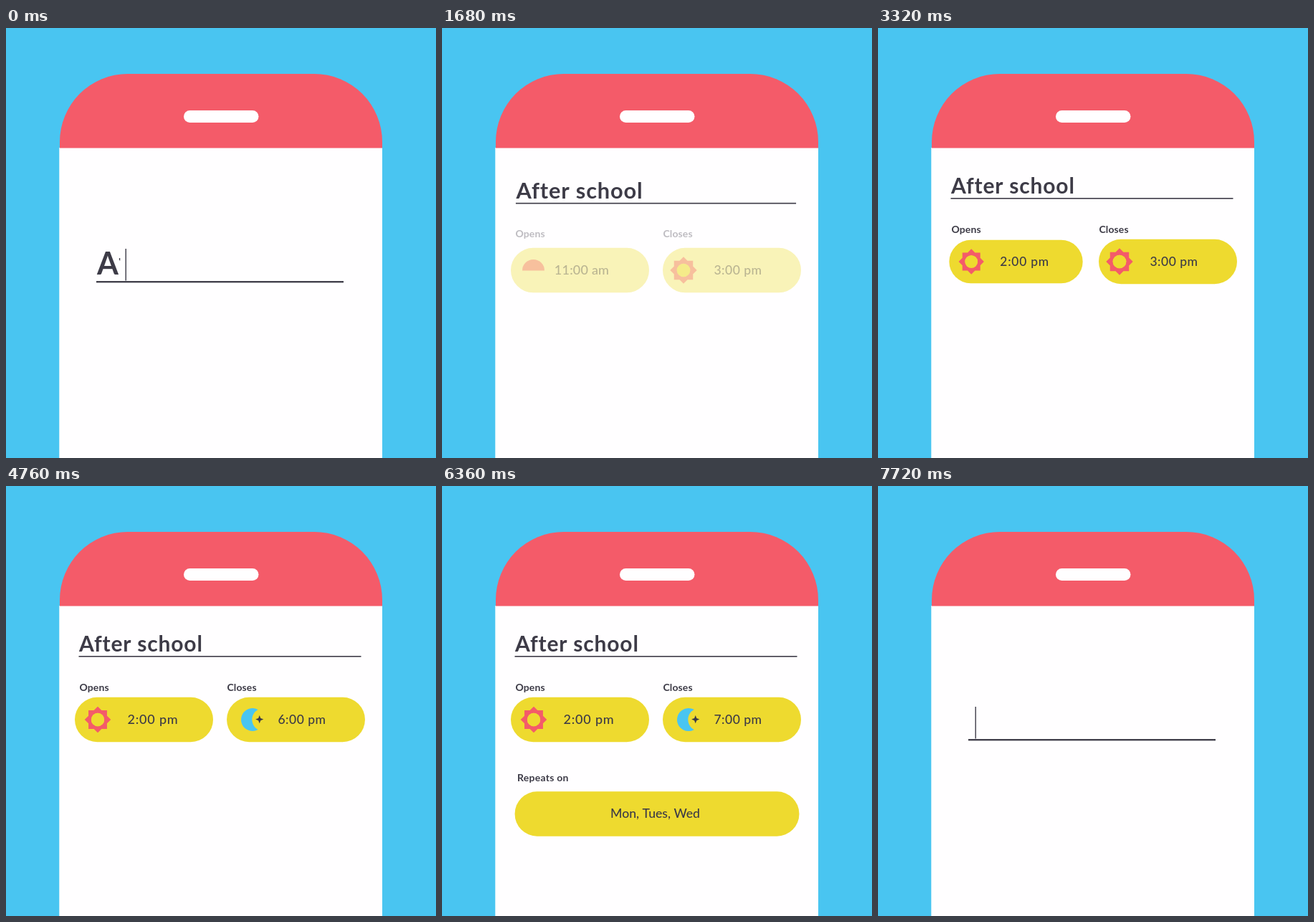
An HTML page with a canvas that plays this animation: 600x600 px, repeating every 7.92 s.

```html
<!DOCTYPE html>
<html lang="en">
<head>
<meta charset="utf-8">
<title>Opening hours form</title>
<style>
  html, body { margin: 0; width: 100%; height: 100%; overflow: hidden; background: #49c5f1; }
  canvas { display: block; }
</style>
</head>
<body>
<canvas id="stage" width="600" height="600"></canvas>
<script>
const ctx = document.getElementById('stage').getContext('2d');
const LOOP = 7920, TAU = Math.PI * 2;
const BLUE = '#49c5f1', RED = '#f45b69', YELLOW = '#eeda2f', INK = '#3d3b47', WHITE = '#fffeff';
const TITLE = 'After school';

// Each tap moves a field on to its next value.
const opens = { values: ['11:00 am', '12:00 pm', '1:00 pm', '2:00 pm'], taps: [2280, 2760, 3240] };
const closes = { values: ['3:00 pm', '4:00 pm', '5:00 pm', '6:00 pm', '7:00 pm'], taps: [3600, 4040, 4440, 4840] };
const days = { values: ['Mon', 'Mon, Tues', 'Mon, Tues, Wed', 'Mon, Tues, Wed, Thurs'], taps: [5520, 5960, 6400] };

const clamp = v => Math.max(0, Math.min(1, v));
const progress = (t, from, to) => clamp((t - from) / (to - from));
const mix = (a, b, p) => a + (b - a) * p;
const inOut = p => p < .5 ? 4 * p ** 3 : 1 - 4 * (1 - p) ** 3;
const out = p => 1 - (1 - p) ** 2;

const step = (field, t) => field.taps.filter(tap => t >= tap).length;

function press(field, t, depth) {
  const tap = field.taps.find(time => Math.abs(t - time - 40) < 120);
  return tap === undefined ? 1 : 1 - depth * Math.cos((t - tap - 40) / 240 * Math.PI);
}

function box(x, y, w, h, r, color) {
  ctx.fillStyle = color;
  ctx.beginPath();
  ctx.roundRect(x, y, w, h, r);
  ctx.fill();
}

function setFont(size, weight, spacing) {
  ctx.font = `${weight} ${size}px Lato, sans-serif`;
  ctx.letterSpacing = spacing + 'px';
}

function label(text, x, y, size, weight, spacing, align = 'left') {
  setFont(size, weight, spacing);
  ctx.textAlign = align;
  ctx.fillStyle = INK;
  ctx.fillText(text, x, y);
}

function sun(x, y, r) {
  ctx.fillStyle = RED;
  ctx.beginPath();
  for (let i = 0; i < 16; i++) {
    const a = i * TAU / 16, d = i % 2 ? r * .765 : r;
    ctx.lineTo(x + d * Math.cos(a), y + d * Math.sin(a));
  }
  ctx.closePath();
  ctx.moveTo(x + r / 2, y);
  ctx.arc(x, y, r / 2, 0, TAU);
  ctx.fill('evenodd');
  ctx.fillStyle = YELLOW;
  ctx.beginPath();
  ctx.arc(x, y, r / 2, 0, TAU);
  ctx.fill();
}

function sunrise(x, y) {
  ctx.fillStyle = RED;
  ctx.beginPath();
  ctx.arc(x, y, 15.5, Math.PI, TAU);
  ctx.fill();
}

function moon(x, y) {
  ctx.fillStyle = BLUE;
  ctx.beginPath();
  ctx.arc(x, y, 16, -1.082, 1.082, true);
  ctx.arc(x + 15.5, y, 16.2, Math.PI - 1.057, Math.PI + 1.057);
  ctx.fill();
  ctx.fillStyle = INK;
  ctx.beginPath();
  for (let i = 0; i < 8; i++) {
    const a = i * TAU / 8, d = i % 2 ? 2.2 : 5.6;
    ctx.lineTo(x + 9.7 + d * Math.cos(a), y - .4 + d * Math.sin(a));
  }
  ctx.fill();
}

// Draws a pill around its centre; the content uses coordinates from there.
function pill(x, y, w, h, scale, content) {
  ctx.save();
  ctx.translate(x, y);
  ctx.scale(scale, scale);
  box(-w / 2, -h / 2, w, h, h / 2, YELLOW);
  content();
  ctx.restore();
}

function phone() {
  ctx.globalAlpha = 1;
  ctx.fillStyle = BLUE;
  ctx.fillRect(0, 0, 600, 600);
  ctx.fillStyle = WHITE;
  ctx.fillRect(74.3, 167, 450.7, 433);
  box(75, 64, 450, 103.5, [95, 95, 0, 0], RED);
  box(248, 115, 104.5, 17, 8.5, WHITE);
}

function title(t, typed, showCursor) {
  const p = inOut(progress(t, 1200, 1837));
  const size = mix(43, 30, p), x = mix(127, 102, p), base = mix(344, 231, p);
  const spacing = size * .027;
  setFont(size, 700, spacing);
  ctx.textAlign = 'left';
  const width = ctx.measureText(TITLE.slice(0, typed)).width;
  if (typed) {
    ctx.save();
    ctx.beginPath();
    ctx.rect(x - 3, base - 50, width + 4.2, 70);
    ctx.clip();
    label(TITLE, x, base, size, 700, spacing);
    ctx.restore();
  }
  ctx.fillStyle = INK;
  const weight = mix(2.3, 1.6, p);
  ctx.fillRect(mix(126, 101.5, p), mix(354.2, 237.8, p) - weight / 2, mix(345, 394, p), weight);
  if (showCursor) ctx.fillRect(135.5 + width, 308, 1.4, 44.5);
}

function hours(t, fade) {
  const alpha = progress(t, 1580, 1880) * fade;
  if (!alpha) return;
  const left = 1 - out(progress(t, 1600, 1960));
  const drop = left * 20, labelDrop = left * 10.5;
  ctx.globalAlpha = alpha;
  label('Opens', 102.5, 286 + labelDrop, 14, 700, .1);
  label('Closes', 308.5, 286 + labelDrop, 14, 700, .1);
  const a = step(opens, t), b = step(closes, t);
  pill(192.5, 326 + drop, 193, 62.5, press(opens, t, .04), () => {
    if (a) sun(-64.5, 0, 18.3); else sunrise(-65, .5);
    label(opens.values[a], a ? 12.5 : 2.5, 6, 18, 500, a ? .8 : .2, 'center');
  });
  pill(404.5, 326 + drop, 193, 62.5, press(closes, t, .04), () => {
    if (b < 3) sun(-67.5, 0, 18.7); else moon(-60.5, 0);
    label(closes.values[b], 8.5, 6, 17.5, 500, .5, 'center');
  });
}

function repeats(t, fade) {
  const alpha = progress(t, 4860, 5160) * fade;
  if (!alpha) return;
  const left = 1 - out(progress(t, 4860, 5240));
  ctx.globalAlpha = alpha;
  label('Repeats on', 105, 412 + left * 12, 14, 700, .25);
  pill(300, 457.5 + left * 24, 401, 63, press(days, t, .02), () => {
    label(days.values[step(days, t)], -2.5, 6, 17.8, 500, 0, 'center');
  });
}

function draw(t) {
  phone();
  if (t < 7360) {
    const fade = 1 - progress(t, 7070, 7360);
    const typed = Math.min(TITLE.length, 1 + Math.floor(t / 80));
    ctx.globalAlpha = fade;
    title(t, typed, t < 1200);
    hours(t, fade);
    repeats(t, fade);
  } else {
    ctx.globalAlpha = progress(t, 7360, 7600);
    title(0, 0, true);
  }
}

const start = performance.now();
function tick() {
  draw((performance.now() - start) % LOOP);
  requestAnimationFrame(tick);
}
tick();
</script>
</body>
</html>
```
